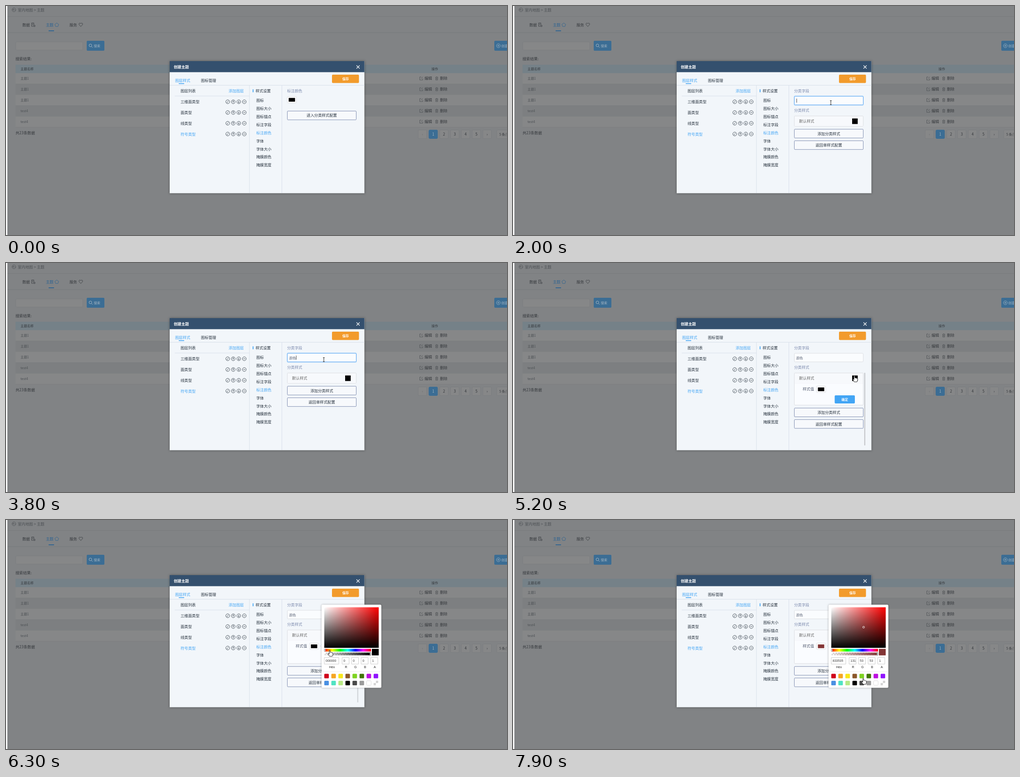
An HTML page with a canvas for the animation above (8000 ms loop, 1105x507 px).

```html
<!DOCTYPE html>
<html lang="zh-CN">
<head>
<meta charset="utf-8">
<style>
html, body { margin: 0; width: 100%; height: 100%; overflow: hidden; background: #818385; }
canvas { display: block; }
</style>
</head>
<body>
<canvas id="stage" width="1105" height="507"></canvas>
<script>
const ctx = document.getElementById('stage').getContext('2d');
const LOOP = 8000, STEP = 100;
const SANS = '"Noto Sans CJK SC", "Noto Sans CJK", sans-serif';
const LATIN = '"Liberation Sans", sans-serif';
const BLUE = '#42a5f5', INK = '#25303c', LABEL = '#7b89ad', LINE = '#d8dfea';
const SMALL = 7.2, NORMAL = 8.4;

const clamp = v => Math.max(0, Math.min(1, v));
const progress = (t, from, to) => clamp((t - from) / (to - from));

function rect(x, y, w, h, fill, stroke, radius = 0) {
  ctx.beginPath();
  ctx.roundRect(x, y, w, h, radius);
  if (fill) { ctx.fillStyle = fill; ctx.fill(); }
  if (stroke) { ctx.strokeStyle = stroke; ctx.lineWidth = 1; ctx.stroke(); }
}

function text(str, x, y, color = INK, { size = NORMAL, weight = 400, align = 'left', family = SANS } = {}) {
  ctx.font = `${weight} ${size}px ${family}`;
  ctx.textAlign = align;
  ctx.textBaseline = 'middle';
  ctx.fillStyle = color;
  ctx.fillText(str, x, y);
}

function stroke(path, x, y, color, width = 0.8) {
  ctx.save();
  ctx.translate(x, y);
  ctx.strokeStyle = color;
  ctx.lineWidth = width;
  ctx.stroke(new Path2D(path));
  ctx.restore();
}

function faded(alpha, draw) {
  if (alpha <= 0) return;
  ctx.save();
  ctx.globalAlpha = alpha;
  draw();
  ctx.restore();
}

const ICON = {
  ring: 'M4.2 0A4.2 4.2 0 1 1 -4.2 0A4.2 4.2 0 1 1 4.2 0',
  pencil: 'M-1.8 1.8L1.8 -1.8M-1.8 1.8L-.6 1.6',
  up: 'M0 2.2V-2.2M-1.7 -.5L0 -2.2L1.7 -.5',
  down: 'M0 -2.2V2.2M-1.7 .5L0 2.2L1.7 .5',
  minus: 'M-2.2 0H2.2',
  plus: 'M-2.2 0H2.2M0 -2.2V2.2',
  back: 'M3 1.5Q2.5 -.8 -2.5 -.3M-.5 -2.3L-2.7 -.3L-.5 1.7',
  edit: 'M0 -3.2H-3.5V3.5H3.2V0M-1 1L3.5 -3.6',
  trash: 'M-3 -2.5H3M-1 -3.6H1M-2.2 -2.5V3.6H2.2V-2.5M-.7 -.8V2M.7 -.8V2',
  sheet: 'M-3.5 -4H1.5V0M-3.5 -4V3.5H0M-2 -2H0M-2 0H0M1 1H4V4H1Z',
  pentagon: 'M0 -4L4.2 -.8L2.6 3.8H-2.6L-4.2 -.8Z',
  heart: 'M0 4L-4 -.5V-2.5L-2 -4L0 -2.5L2 -4L4 -2.5V-.5Z',
  search: 'M2.2 -.8A3 3 0 1 1 -3.8 -.8A3 3 0 1 1 2.2 -.8M1.4 1.4L4 4',
  close: 'M-3.5 -3.5L3.5 3.5M3.5 -3.5L-3.5 3.5'
};

function ringIcon(name, x, y, color) {
  stroke(ICON.ring, x, y, color);
  stroke(ICON[name], x, y, color);
}

function drawPage() {
  const ink = '#36393d', dim = '#4c5054', blue = '#2b6292', button = '#3b6d94', pale = '#a5b6c3';
  rect(0, 0, 1105, 507, '#818385');
  rect(0, 23, 1105, 1, '#777a7c');
  rect(0, 58.5, 1105, 1, '#777a7c');
  ringIcon('back', 17.5, 8.5, dim);
  text('室内地图 > 主题', 26, 8.5, dim);

  text('数据', 36, 42, ink);
  stroke(ICON.sheet, 60, 41.5, ink);
  text('主题', 88, 42, blue);
  stroke(ICON.pentagon, 112, 41.5, blue);
  text('服务', 140, 42, ink);
  stroke(ICON.heart, 165, 41.5, ink);
  rect(94, 54, 12, 1.8, blue);

  rect(21.5, 79.5, 148, 18, '#868788', '#7b7d80', 2);
  rect(178, 77, 39, 22, button, null, 2);
  stroke(ICON.search, 187, 88, pale, 1);
  text('搜索', 193.5, 88.5, pale, { size: SMALL });
  rect(1077, 77, 40, 22, button, null, 2);
  ringIcon('plus', 1086, 88, pale);
  text('创建', 1092.5, 88.5, pale, { size: SMALL });

  text('搜索结果:', 21, 117, ink);
  rect(21, 130, 1084, 19, '#758188');
  text('主题名称', 32, 139.5, ink, { size: SMALL });
  text('操作', 938.5, 139.5, ink, { size: SMALL });
  ['主题1', '主题1', '主题1', 'test4', 'test4'].forEach((name, i) => {
    const y = 160.3 + i * 23.9;
    rect(21, y - 11.5, 1084, 23.9, i % 2 ? '#7d7f81' : '#868788');
    rect(21, y + 12, 1084, 0.6, '#797b7d');
    text(name, 32, y, dim, { size: SMALL });
    stroke(ICON.edit, 916, y, dim);
    text('编辑', 923, y, ink);
    stroke(ICON.trash, 950, y, dim);
    text('删除', 957, y, ink);
  });

  text('共23条数据', 21, 280.5, ink);
  ['‹', '1', '2', '3', '4', '5', '›'].forEach((label, i) => {
    const x = 918.5 + i * 23.8, current = label === '1';
    rect(x - 9.5, 274.5, 19, 19, current ? button : '#868788', current ? button : '#7b7d80', 2);
    text(label, x, 284, current ? pale : i ? ink : '#6b6d70', { align: 'center' });
  });
  rect(1082.5, 274.5, 40, 19, '#868788', '#7b7d80', 2);
  text('5 条/页', 1088, 284, ink, { size: SMALL });
  rect(0, 0, 3, 507, '#fff');
}

function drawDialog() {
  ctx.save();
  ctx.shadowColor = 'rgba(0,0,0,.35)';
  ctx.shadowBlur = 5;
  rect(361, 122, 429.5, 292.5, '#f2f6fa');
  ctx.restore();
  rect(361, 122, 429.5, 24.5, '#34506e');
  text('创建主题', 370, 134.5, '#fff', { weight: 700 });
  stroke(ICON.close, 776.5, 135, '#fff', 1.1);

  text('图层样式', 373, 164.5, BLUE);
  rect(381, 171, 12, 1.6, BLUE);
  text('图标管理', 430, 164.5);
  rect(719, 152, 59.5, 18.5, '#f29b2c', null, 2);
  text('保存', 749, 161.2, '#fff', { size: SMALL, weight: 700, align: 'center' });

  rect(361, 175, 429.5, 1, LINE);
  rect(536.5, 176, 1, 238, LINE);
  rect(608, 176, 1, 238, LINE);
  rect(372, 198.8, 165, 1, LINE);

  text('图层列表', 385, 188);
  text('添加图层', 491, 188, BLUE);
  ['三维面类型', '面类型', '线类型', '符号类型'].forEach((name, i) => {
    const y = 212 + i * 23.8;
    text(name, 385, y, i === 3 ? BLUE : INK);
    ['pencil', 'up', 'down', 'minus'].forEach((icon, k) => ringIcon(icon, 489 + k * 12.2, y, INK));
  });

  rect(544, 184.5, 1.8, 6.5, BLUE);
  text('样式设置', 550.5, 188);
  ['图标', '图标大小', '图标锚点', '标注字段', '标注颜色', '字体', '字体大小', '掩膜颜色', '掩膜宽度']
    .forEach((name, i) => text(name, 552, 209 + i * 17.9, i === 4 ? BLUE : INK));
}

function outlineButton(label, y) {
  rect(620.5, y - 9.7, 152, 19.4, '#f7f9fc', '#7f8db0', 1.5);
  text(label, 696.5, y, INK, { align: 'center' });
}

function swatch(x, y, color) {
  rect(x + 0.5, y + 0.5, 20, 14, '#fff', '#dcdee2', 1);
  rect(x + 3.5, y + 3.5, 14, 8.3, color);
}

function drawSingleStyle() {
  text('标注颜色', 620, 188, LABEL);
  swatch(620, 200, '#000');
  outlineButton('进入分类样式配置', 242.3);
}

// Typed text by time; letters are still being composed until the candidate is chosen.
const TYPING = [[2700, 'y'], [2800, 'ya'], [2900, 'yan'], [3300, "yan's"], [3400, "yan'se"], [3800, '颜色']];
const typedAt = t => (TYPING.findLast(([start]) => t >= start) || [0, ''])[1];
const caretOn = t => t < 2400 || (t >= 2700 && t < 4300);

function drawField(t) {
  const focused = t >= 1900 && t < 5000, typed = typedAt(t);
  if (focused) rect(619.5, 198.5, 154, 22, 'rgba(66,165,245,.3)', null, 2.5);
  rect(620.5, 199.9, 152, 19, '#fafcfe', focused ? '#57a3f3' : '#dcdee2', 2);
  text(typed, 625, 209.8, '#515a6e', { size: SMALL });
  const end = 625 + ctx.measureText(typed).width;
  if (focused && caretOn(t)) rect(end + 0.3, 205, 0.9, 9, '#333');
  if (t >= 2700 && t < 3800) rect(625, 214, end - 625, 0.6, '#515a6e');
}

function drawCandidates(t) {
  if (t < 2700 || t >= 3800) return;
  const long = t >= 3300;
  const words = long ? ['颜色', '眼色', '颜', '眼', '严', '言'] : ['眼', '严', '烟', '言', '颜', '演'];
  const width = long ? 346 : 274, gap = width / words.length;
  rect(642.5, 220.5, width, 21, '#fff', '#c9ccd1');
  words.forEach((word, i) =>
    text(`${i + 1} ${word}`, 650 + i * gap, 231, i ? '#333' : '#0a6cc9', { size: 10 }));
}

function drawCategoryStyle(t, color) {
  const openness = 1 - (1 - progress(t, 4980, 5300)) ** 2.4;
  const shift = 51.5 * openness;
  text('分类字段', 620, 188, LABEL);
  drawField(t);
  text('分类样式', 620, 231, LABEL);

  rect(620.5, 243.5, 152, 22.8 + shift, '#fafcff', '#dcdee2', 1.5);
  ctx.save();
  ctx.beginPath();
  ctx.rect(620, 266, 153, shift);
  ctx.clip();
  rect(621, 265.5, 151, 0.8, '#dcdee2');
  text('样式值', 639, 279.3, '#515a6e');
  swatch(669, 272, color);
  rect(709.5, 293, 44.5, 18, BLUE, null, 2);
  text('确定', 731.8, 302, '#fff', { size: SMALL, weight: 700, align: 'center' });
  ctx.restore();
  rect(621, 244, 151, 21.8, '#f7f9fc');
  text('默认样式', 631, 254.8, '#666');
  rect(748, 249, 12.3, 12.3, '#000');

  outlineButton('添加分类样式', 282.5 + shift);
  outlineButton('返回单样式配置', 308 + shift);

  const first = 1 - progress(t, 1300, 1700), second = progress(t, 4600, 4800) * (1 - progress(t, 6100, 6800));
  faded(Math.max(first, second), () => rect(774.7, 243, 2.3, 161, '#c6c8cc', null, 1));
  drawCandidates(t);
}

function gradient(x0, y0, x1, y1, ...colors) {
  const g = ctx.createLinearGradient(x0, y0, x1, y1);
  colors.forEach((c, i) => g.addColorStop(i / (colors.length - 1), c));
  return g;
}

function checker(x, y, w, h, cell) {
  rect(x, y, w, h, '#fff');
  for (let i = 0; i * cell < w; i++)
    for (let j = 0; j * cell < h; j++)
      if ((i + j) % 2) rect(x + i * cell, y + j * cell, Math.min(cell, w - i * cell), Math.min(cell, h - j * cell), '#d4d4d4');
}

const PRESETS = ('#d0021b #f5a623 #f8e71c #8b572a #7ed321 #417505 #bd10e0 #9013fe ' +
  '#4a90e2 #50e3c2 #b8e986 #000000 #4a4a4a #9b9b9b #ffffff none').split(' ');

function drawPicker(color, rgb, point) {
  ctx.save();
  ctx.shadowColor = 'rgba(0,0,0,.3)';
  ctx.shadowBlur = 4;
  rect(696, 187.5, 131.8, 184, '#fff', null, 2.5);
  ctx.restore();
  stroke('M2.5 -3.5L-1 0L2.5 3.5', 694, 279, '#c8ccd2');

  rect(702, 193.3, 120, 89.7, gradient(702, 0, 822, 0, '#fff', '#f00'));
  rect(702, 193.3, 120, 89.7, gradient(0, 193.3, 0, 283, 'rgba(0,0,0,0)', '#000'));
  ctx.save();
  ctx.beginPath();
  ctx.rect(702, 193.3, 120, 89.7);
  ctx.clip();
  if (point) stroke('M2 0A2 2 0 1 1 -2 0A2 2 0 1 1 2 0', ...point, '#fff', 1);
  ctx.restore();

  rect(702.5, 285.3, 102.5, 6, gradient(702.5, 0, 805, 0, '#f00', '#ff0', '#0f0', '#0ff', '#00f', '#f0f', '#f00'));
  checker(702.5, 293.5, 102.5, 6, 3);
  rect(702.5, 293.5, 102.5, 6, gradient(702.5, 0, 805, 0, `rgba(${rgb},0)`, color));
  rect(702.2, 285.8, 2.2, 5, '#fff', '#888', 0.5);
  rect(802.5, 294, 2.2, 5, '#fff', '#666', 0.5);
  rect(807, 285.3, 15, 14.4, color);

  const fields = [[color.slice(1), 'Hex', 718, 32], [rgb[0], 'R', 749, 15.5], [rgb[1], 'G', 769.8, 15.5],
    [rgb[2], 'B', 791, 15.5], [1, 'A', 812.3, 15.5]];
  for (const [value, label, x, w] of fields) {
    rect(x - w / 2, 304.5, w, 14.5, '#fff', '#ccc');
    text(value, x - w / 2 + 3, 312, '#333', { size: 7, family: LATIN });
    text(label, x + 1, 326.3, '#222', { size: 7, align: 'center', family: LATIN });
  }
  rect(696, 335.5, 131.8, 0.8, '#e8e8e8');
  PRESETS.forEach((preset, i) => {
    const x = 702 + (i % 8) * 15.55, y = 340.4 + Math.floor(i / 8) * 15.5;
    if (preset === 'none') checker(x, y, 10, 10, 5);
    else rect(x, y, 10, 10, preset, preset === '#ffffff' ? '#ddd' : null, 1.5);
  });
}

// Pointer hotspot over time: [ms, x, y, shape held until the next entry].
const POINTER = [
  [100, 975, 134, 'arrow'], [300, 775, 222, 'arrow'], [400, 744, 237, 'hand'],
  [900, 744, 237, 'arrow'], [1100, 744, 237, 'arrow'], [1600, 702, 216, 'beam'], [2000, 701, 214, 'beam'],
  [4400, 701, 214, 'beam'], [4600, 722, 228, 'arrow'], [4800, 753, 247, 'hand'], [5300, 753, 250, 'hand'],
  [5400, 748, 264, 'arrow'], [5700, 692, 294, 'arrow'], [5800, 685, 284, 'hand'], [6000, 685, 282, 'hand'],
  [6100, 689, 291, 'arrow'], [6200, 703, 290, 'hand'], [6300, 714, 288, 'hand'], [6900, 706, 287, 'hand'],
  [7100, 706, 287, 'hand'], [7400, 773, 237, 'hand'], [7500, 773, 237, 'hand'], [7900, 772.5, 350, 'hand']
];
const ARROW = new Path2D('M0 0V9.6L2.2 7.6L3.7 11L5.2 10.3L3.7 7.1H6.7Z');
const HAND = new Path2D('M-1 1Q0 -.6 1 1V5Q2 4.2 3 5.3Q4.2 4.6 5 6Q6.7 5.4 7 7V10L5.6 13.8H-.4L-3.6 8.6Q-3.6 7 -2.2 7.7L-1 9Z');

function drawPointer(t) {
  const i = POINTER.findLastIndex(([start]) => t >= start);
  if (i < 0) return;
  const [t0, x0, y0, shape] = POINTER[i], [t1, x1, y1] = POINTER[i + 1] || [LOOP, x0, y0];
  const k = progress(t, t0, t1);
  const x = x0 + (x1 - x0) * k, y = y0 + (y1 - y0) * k;
  if (shape === 'beam') return stroke('M-1.8 -4.5H1.8M0 -4.5V4.5M-1.8 4.5H1.8', x, y, '#222', 1);
  const path = shape === 'hand' ? HAND : ARROW;
  ctx.save();
  ctx.translate(x, y);
  ctx.fillStyle = '#fff';
  ctx.fill(path);
  ctx.strokeStyle = '#111';
  ctx.lineWidth = 0.9;
  ctx.stroke(path);
  ctx.restore();
}

function draw(t) {
  const picked = t >= 7500;
  const color = picked ? '#833535' : '#000000', rgb = picked ? [131, 53, 53] : [0, 0, 0];
  drawPage();
  drawDialog();
  if (t < 900) drawSingleStyle();
  else drawCategoryStyle(t, color);

  const opacity = t < 6100 ? 0 : t < 6200 ? 0.4 : t < 6300 ? 0.85 : 1;
  if (opacity === 1) drawPicker(color, rgb, picked && [773.3, 237.3]);
  else faded(opacity, () => drawPicker(color, rgb, null));
  drawPointer(t);
}

function tick() {
  draw(Math.floor(performance.now() % LOOP / STEP) * STEP);
  requestAnimationFrame(tick);
}
tick();
</script>
</body>
</html>
```
